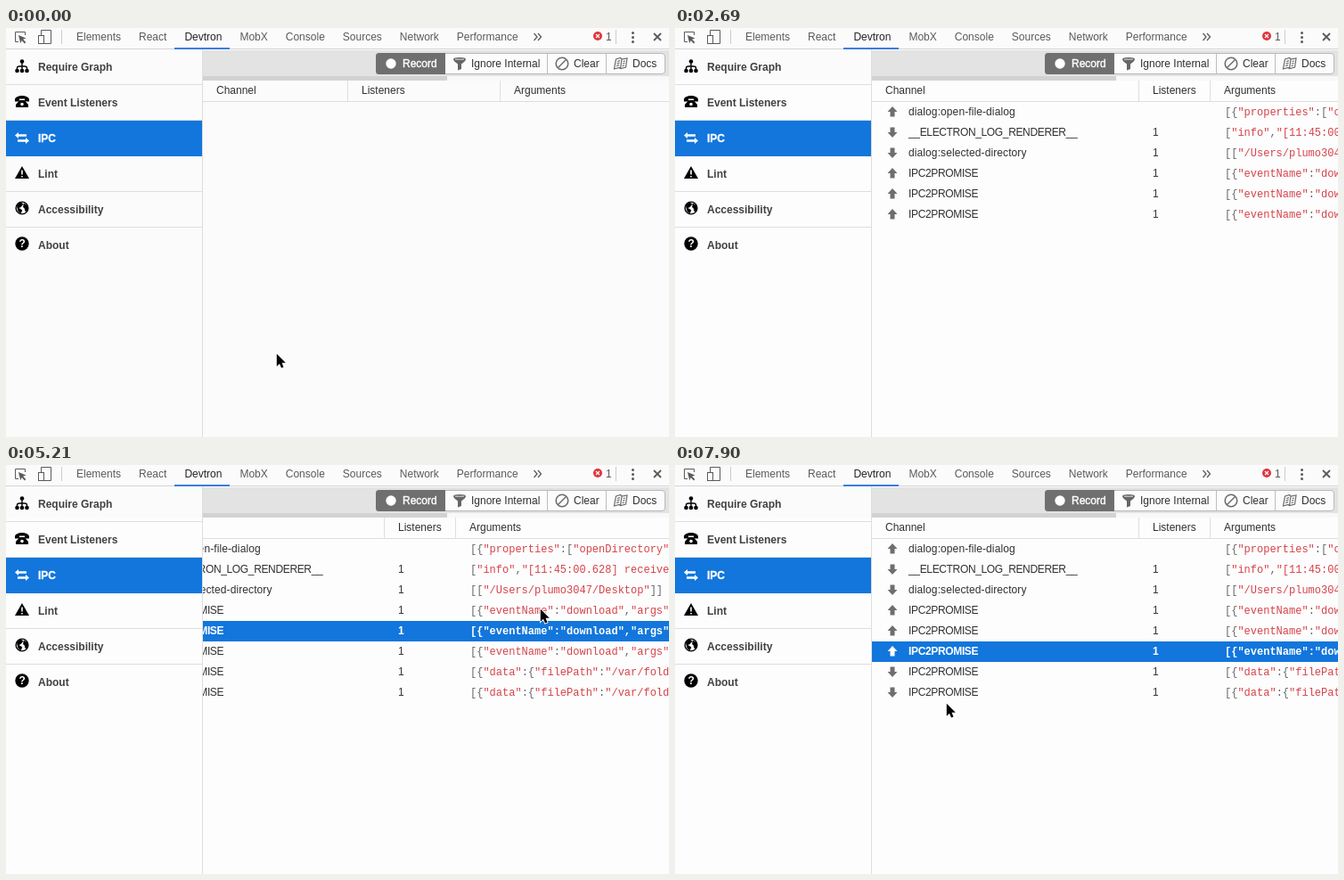
Write an HTML page that moves like this. It is 744x459 px and loops after 8 s.

```html
<!DOCTYPE html>
<html lang="en">
<head>
<meta charset="utf-8">
<title>IPC inspector</title>
<style>
  html, body { margin: 0; width: 100%; height: 100%; overflow: hidden; background: #fbfbfb; }
  svg { display: block; width: 744px; height: 459px; }
  text { font: 12px "Liberation Sans", Arial, sans-serif; fill: #303030; white-space: pre; }
  .tab { fill: #5a5a5a; }
  .tab .on { fill: #222; }
  .side { font-weight: bold; fill: #404040; }
  .side.on { fill: #fff; stroke: #fff; stroke-width: .3; }
  .caps { letter-spacing: -.35px; }
  .low { letter-spacing: .1px; }
  .num { fill: #3a3440; }
  .json { font: 12px "Liberation Mono", "Courier New", monospace; fill: #666; }
  .str { fill: #d5434a; }
  .row .arrow { fill: #6e6e6e; }
  .row .back { fill: none; }
  .row.on .back { fill: #1276dc; }
  .row.on text { font-weight: bold; }
  .row.on :is(text, tspan, .arrow) { fill: #fff; }
  .line { stroke: #dedede; fill: none; }
  .gray { stroke: #5a5a5a; fill: none; }
</style>
</head>
<body>
<svg viewBox="0 0 744 459">
  <defs><clipPath id="panel"><path d="M221 59H744V459H221z"/></clipPath></defs>
  <rect width="744" height="459" fill="#fbfbfb"/>
  <rect id="paper" y="59" width="744" height="400"/>

  <text id="tabs" class="tab" x="59" y="14"></text>
  <text class="tab" x="673" y="14">1</text>
  <path d="M0 23.5H744" stroke="#d4d4d4"/>
  <path d="M189 22h62v2h-62z" fill="#3b7de0"/>
  <g class="gray">
    <path d="M21.5 8V4.5H10.5V15.5H14"/>
    <path d="M14 8l8.5 3.5-3.4 1.3 3.2 3.3-1.3 1.3-3.3-3.3-1.4 3.2z" fill="#5a5a5a" stroke="none"/>
    <path d="M39.5 8V2.5H50.5V17.5H43"/>
    <rect x="36.5" y="8.5" width="6" height="9"/>
    <path d="M592.5 6l3.5 4-3.5 4M597 6l3.5 4-3.5 4" stroke-width="1.3"/>
    <path d="M727 6l8 8M735 6l-8 8" stroke-width="1.8"/>
  </g>
  <path d="M62.5 2V18M684.5 2V18" stroke="#ccc"/>
  <circle cx="664" cy="9" r="5" fill="#e0343c"/>
  <path d="M662 7l4 4M666 7l-4 4" stroke="#fff" stroke-width="1.2"/>
  <path d="M703.5 5.5v11" stroke="#5a5a5a" stroke-width="3" stroke-linecap="round" stroke-dasharray="0 5"/>

  <g id="side"></g>
  <g stroke="#000" fill="none" stroke-width="1.4">
    <path d="M18 38V48M12.5 48V45Q12.5 43 15 43H21Q23.5 43 23.5 45V48"/>
    <g fill="#000" stroke="none">
      <circle cx="18" cy="37.5" r="2.3"/><circle cx="12.5" cy="48" r="2.3"/><circle cx="18" cy="48" r="2.3"/><circle cx="23.5" cy="48" r="2.3"/>
      <path d="M10 80.5C10 74.5 26 74.5 26 80.5V82.5H21V79.5H15V82.5H10z"/>
      <path d="M15.5 81H20.5L25 86V89H11V86z"/>
      <path d="M18 155L26 169H10z"/>
      <circle cx="18" cy="242" r="7.7"/>
    </g>
    <circle cx="18" cy="85.5" r="1.8" fill="#fbfbfb" stroke="none"/>
    <path d="M18 159.5V164.5M18 166V167.5" stroke="#fff" stroke-width="1.6"/>
    <circle cx="18" cy="202" r="6.9"/>
    <path d="M12 199L16 195.5L19 197.5L17 200.5L14 202L18 204.5L16.5 208L14 206zM20 197L24 199L24.5 204L22 206L21 202.5L19.5 201z" fill="#000" stroke-width=".6"/>
    <path d="M10 120.5L14 117V119.300H23V121.700H14V124zM26 126.500L22 123V125.300H13V127.700H22V130z" fill="#fff" stroke="none"/>
  </g>
  <text x="14.5" y="246" style="font-weight:bold;fill:#fff">?</text>
  <path class="line" d="M220.5 24V459"/>

  <rect x="221" y="25" width="523" height="29" fill="#e3e3e3"/>
  <path d="M221 54H495V59H221z" fill="#d2d2d2"/>
  <path d="M495 54H744V59H495z" fill="#f8f8f8"/>
  <rect x="415.5" y="28.5" width="324" height="23" rx="3.5" fill="#fcfcfc" stroke="#b8b8b8"/>
  <path d="M493 28H418.5Q415 28 415 31.5V48.5Q415 52 418.5 52H493z" fill="#6f6f6f"/>
  <path d="M607.5 28V52M673.5 28V52" stroke="#bdbdbd"/>
  <circle cx="432" cy="40" r="5.7" fill="#fff"/>
  <path d="M502 35Q502 33 509 33T516 35Q516 37 511 40.5V46L507 47.5V40.5Q502 37 502 35z" fill="#666"/>
  <path d="M504 35.2H514" stroke="#ddd"/>
  <g fill="none" stroke="#6a6a6a" stroke-width="1.5">
    <circle cx="624" cy="40" r="6.8"/><path d="M619.5 44.5L628.5 35.5"/>
    <path d="M684.500 35L689.500 33.500L691 35L697 34L695.500 44L689.500 45.500L688 44.500L682.500 46zM691 35L689.500 45.500M686 37.500L689 36.700M685.500 40L688.500 39.200M685 42.500L688 41.700M692.500 37.500L695 37M692 40L694.500 39.500M691.500 42.500L694 42" stroke-width="1.2"/>
  </g>
  <text x="445" y="44" style="fill:#fff;stroke:#fff;stroke-width:.4">Record</text>
  <text x="522" y="44">Ignore Internal</text>
  <text x="637" y="44">Clear</text>
  <text x="703" y="44">Docs</text>

  <g clip-path="url(#panel)">
    <path class="line" d="M221 82.5H744"/>
    <g id="table"><g id="head"></g><g id="rows"></g></g>
  </g>
  <path id="cursor" d="M0 0V14L3.200 11L5.200 15.800L7.700 14.700L5.700 10H10z" stroke="#fff" stroke-width="1.6" paint-order="stroke"/>
</svg>
<script>
const LOOP = 8000, BEAT = 149;
const ROW_TOP = 83, ROW_HEIGHT = 23;
const $ = id => document.getElementById(id);
const label = (x, y, str, cls = '') => `<text x="${x}" y="${y}" class="${cls}">${str}</text>`;

$('tabs').innerHTML = 'Elements React Devtron MobX Console Sources Network Performance'.split(' ')
  .map(s => `<tspan dx="20" class="${s === 'Devtron' ? 'on' : ''}">${s}</tspan>`).join('');

$('side').innerHTML = ['Require Graph', 'Event Listeners', 'IPC', 'Lint', 'Accessibility', 'About'].map((s, i, all) => {
  const y = 24 + 40 * i, on = s === 'IPC';
  return (on ? `<rect y="${y}" width="220" height="40" fill="#1276dc"/>` : '')
    + (!on && i < all.length - 1 ? `<path class="line" d="M0 ${y + 39.5}H220"/>` : '')
    + label(36, y + 24, s, on ? 'side on' : 'side');
}).join('');

// Messages: arrival beat, direction, channel, arguments
const download = [18, 'up', 'IPC2PROMISE', '[{"eventName":"download","args":["file"]}]'];
const reply = [19, 'down', 'IPC2PROMISE', '[{"data":{"filePath":"/var/folders/tmp"}}]'];
const messages = [
  [11, 'up', 'dialog:open-file-dialog', '[{"properties":["openDirectory"]}]'],
  [12, 'down', '__ELECTRON_LOG_RENDERER__', '["info","[11:45:00.628] received path"]'],
  [12, 'down', 'dialog:selected-directory', '[["/Users/plumo3047/Desktop"]]'],
  download, download, download, reply, reply
];
const json = s => s.replace(/"[^"]*"/g, m => `<tspan class="str">${m}</tspan>`);

$('rows').innerHTML = messages.map(([, dir, channel, args], i) => {
  const top = ROW_TOP + ROW_HEIGHT * i, y = top + 15;
  return `<g class="row"><rect class="back" x="221" y="${top}" width="800" height="${ROW_HEIGHT}"/>
    <path class="arrow" transform="translate(244 ${top + 11}) scale(1 ${dir === 'up' ? 1 : -1})" d="M0-6L5.5 0H2.5V5.5H-2.5V0H-5.5z"/>`
    + label(262, y, channel, /[a-z]/.test(channel) ? 'low' : 'caps')
    + (i ? label(536, y, '1', 'num') : '')
    + label(617, y, json(args), 'json') + '</g>';
}).join('');
const rows = [...$('rows').children];

const header = (a, b) => label(236, 74, 'Channel') + label(a + 16, 74, 'Listeners') + label(b + 16, 74, 'Arguments')
  + `<path class="line" d="M${a + .5} 59V82M${b + .5} 59V82"/>`;

// Key points are [beat, ...values], joined by straight glides.
function glide(points, beat) {
  const next = points.findIndex(p => p[0] > beat);
  if (next < 0) return points.at(-1).slice(1);
  const a = points[Math.max(0, next - 1)], b = points[next];
  const u = Math.max(0, (beat - a[0]) / (b[0] - a[0]));
  return a.slice(1).map((v, i) => v + (b[i + 1] - v) * u);
}

// The pointer is only in view during these visits.
const visits = [
  { from: 0, to: 2, path: [[0, 303, 365], [1, 318, 357]] },
  { from: 9, to: 9, path: [[9, 453, 422]] },
  { from: 21, to: 53, path: [
    [21, 412, 430], [25, 490, 256], [31, 597, 178], [33, 597, 178], [35, 599, 161], [37, 599, 161],
    [41, 597, 200], [46, 443, 247], [50, 443, 247], [53, 304, 267]
  ] }
];
const scrolling = [[23, 0], [25, 49], [27, 96], [46, 96], [47, 78], [50, 0]];
const clicks = [33, 37, 42];

function pointer(beat) {
  const visit = visits.find(v => beat >= v.from && beat <= v.to);
  return visit && glide(visit.path, beat);
}

function selectedRow(beat) {
  const click = clicks.findLast(c => c <= beat);
  return click ? Math.floor((pointer(click)[1] - ROW_TOP) / ROW_HEIGHT) : -1;
}

let lastBeat = -1;
function draw(t) {
  const beat = Math.floor(t / BEAT + .1);
  if (beat === lastBeat) return;
  lastBeat = beat;

  const spot = pointer(beat), selected = selectedRow(beat);
  const filled = beat >= messages[0][0];
  $('cursor').style.display = spot ? '' : 'none';
  if (spot) $('cursor').setAttribute('transform', `translate(${spot.map(v => Math.round(v) + .8)})`);
  $('table').setAttribute('transform', `translate(${-Math.round(glide(scrolling, beat)[0])} 0)`);
  $('paper').setAttribute('fill', filled ? '#fdfdfd' : '#fbfbfb');
  $('head').innerHTML = filled ? header(520, 600) : header(383, 554);
  rows.forEach((row, i) => {
    row.style.display = beat >= messages[i][0] ? '' : 'none';
    row.classList.toggle('on', i === selected);
  });
}

const start = performance.now();
function tick() {
  draw((performance.now() - start) % LOOP);
  requestAnimationFrame(tick);
}
tick();
</script>
</body>
</html>
```
